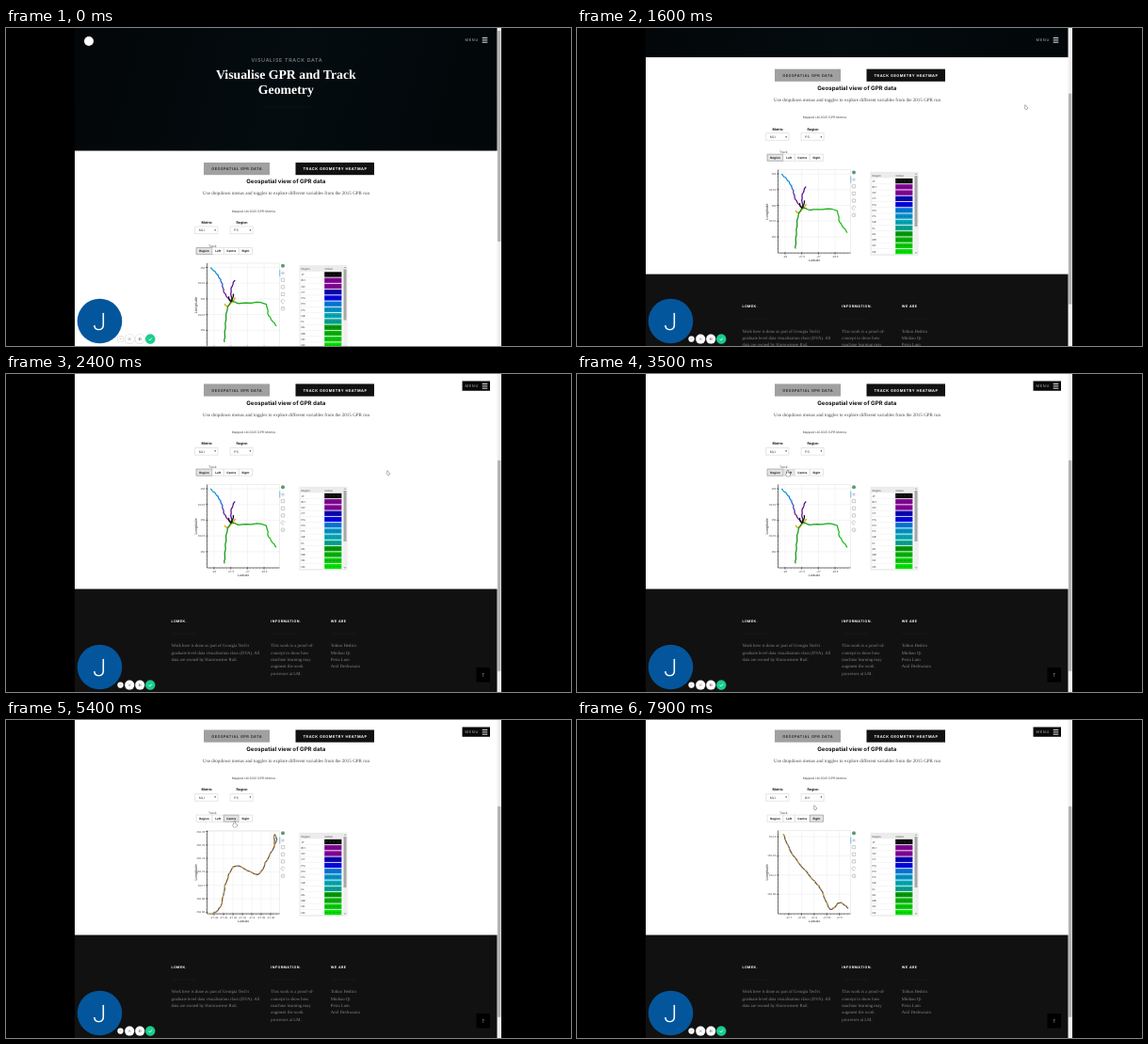
An HTML page with a canvas that plays this animation: 600x338 px, repeating every 8000 ms.

```html
<!DOCTYPE html>
<html lang="en">
<head>
<meta charset="utf-8">
<title>Track data viewer</title>
<style>
html, body { margin: 0; width: 100%; height: 100%; overflow: hidden; background: #000; }
canvas { display: block; width: 600px; height: 338px; }
</style>
</head>
<body>
<canvas id="stage"></canvas>
<script>
const canvas = document.getElementById('stage');
const c = canvas.getContext('2d');
const ratio = window.devicePixelRatio || 1;
canvas.width = 600 * ratio;
canvas.height = 338 * ratio;

const SANS = 'Inter, sans-serif', SERIF = '"Liberation Serif", serif', ARIAL = '"Liberation Sans", sans-serif';
const LOOP = 8000, STEP = 100, END = 132.5;

// Pointer moves: start, end, x, y
const MOVES = [[2100, 2400, 406, 105], [2400, 3200, 224, 104], [4300, 4700, 243, 109],
  [5400, 5700, 254, 107], [6200, 6900, 253, 84], [7100, 7500, 253, 93]];

// Legend colours: row, hue, lightness
const SPECTRUM = [[0, 292, 0], [1, 292, 30], [2, 292, 30], [3, 242, 35], [4, 240, 45], [5, 207, 43],
  [8, 173, 33], [9, 122, 31], [12, 120, 45]];
const REGIONS = 'JT BH CR CT PG PN PS GE FL ML ME NC NA'.split(' ');

// Axes: first position, gap, first value, increment, count
const PLOTS = {
  all: { x: [221, 17.7, -28, .5, 4], y: [122, 16.7, 154, -.5, 5] },
  track: { x: [221, 10, -27.44, .01, 7], y: [118.5, 14.3, 152.78, -.02, 7],
    route: [[219, 206], [228, 198], [234, 172], [244, 155], [267, 164], [277, 149], [287, 129], [285, 122], [285, 132]] },
  branch: { x: [225, 13.4, -27.7, .05, 5], y: [124, 20.4, 152.2, -.05, 4],
    route: [[219, 121], [229, 143], [250, 169], [259, 180], [269, 201], [279, 194], [288, 200]] }
};

const clamp = v => Math.min(1, Math.max(0, v));

function rect(x, y, w, h, fill, stroke) {
  if (fill) { c.fillStyle = fill; c.fillRect(x, y, w, h); }
  if (stroke) { c.strokeStyle = stroke; c.lineWidth = .5; c.strokeRect(x, y, w, h); }
}
function disc(x, y, r, fill) {
  c.fillStyle = fill;
  c.beginPath();
  c.arc(x, y, r, 0, 7);
  c.fill();
}
function text(s, x, y, font, fill, align = 'left', gap = 0) {
  c.font = font;
  c.fillStyle = fill;
  c.textAlign = align;
  c.letterSpacing = gap + 'px';
  c.fillText(s, x, y);
}
function line(points, stroke, width = .5, dash = []) {
  c.strokeStyle = stroke;
  c.lineWidth = width;
  c.setLineDash(dash);
  c.beginPath();
  points.forEach(p => c.lineTo(...p));
  c.stroke();
  c.setLineDash([]);
}
function fade(x0, y0, x1, y1, ...colours) {
  const g = c.createLinearGradient(x0, y0, x1, y1);
  colours.forEach((colour, i) => g.addColorStop(i / (colours.length - 1), colour));
  return g;
}
function at(keys, k) {
  const i = Math.max(1, keys.findIndex(key => key[0] >= k));
  const a = keys[i - 1], b = keys[i], u = (k - a[0]) / (b[0] - a[0]);
  return a.slice(1).map((v, j) => v + (b[j + 1] - v) * u);
}
// Smooth curve through the points with a slight wobble, as surveyed track has
function curve(points, wobble = .4) {
  const out = [];
  for (let i = 0; i < points.length - 1; i++) {
    const [p, a, b, q] = [-1, 0, 1, 2].map(d => points[i + d] || points[d < 0 ? i : i + 1]);
    for (let k = 0; k <= 6; k++) {
      const u = k / 6, n = i * 6 + k;
      out.push([0, 1].map(j => a[j] + .5 * u * (b[j] - p[j]
        + u * (2 * p[j] - 5 * a[j] + 4 * b[j] - q[j] + u * (3 * (a[j] - b[j]) + q[j] - p[j])))
        + wobble * Math.sin(n * 2.1 + j * 1.6)));
    }
  }
  return out;
}

function header() {
  rect(73, 0, 449, 130.5, fade(73, 0, 521, 130, '#030608', '#040c0f', '#020709'));
  disc(88, 14, 5, '#fff');
  text('VISUALISE TRACK DATA', 298.3, 36, '500 5.4px ' + SANS, '#858a8c', 'center', .65);
  const title = 'bold 13.8px ' + SERIF;
  text('Visualise GPR and Track', 297.3, 53.5, title, '#fff', 'center');
  text('Geometry', 297.3, 70.3, title, '#fff', 'center');
  line([[275, 84], [324, 84]], '#10191c');
}

function select(x, value) {
  rect(x, 78.5, 24.2, 7.7, '#fff', '#ccc');
  text(value, x + 4, 83.8, '3.6px ' + ARIAL, '#444');
  text('▾', x + 21.3, 83.4, '3.4px "DejaVu Sans", sans-serif', '#333', 'center');
}

function controls(active, region, hover) {
  rect(210, 10.5, 70, 13.2, '#a0a0a0');
  text('GEOSPATIAL GPR DATA', 245.2, 18.5, '600 3.9px ' + SANS, '#222', 'center', .5);
  rect(307.5, 10.5, 83.5, 13.2, '#111');
  text('TRACK GEOMETRY HEATMAP', 349.5, 18.5, 'bold 3.9px ' + SANS, '#fff', 'center', .5);
  text('Geospatial view of GPR data', 297.3, 32.6, 'bold 6.15px ' + SANS, '#111', 'center');
  text('Use dropdown menus and toggles to explore different variables from the 2015 GPR run', 297.5, 44.7,
    '5.05px ' + SERIF, '#444', 'center');
  text('Mapped LM 2015 GPR Metrics', 263, 63, '3.4px ' + ARIAL, '#444', 'center');
  text('Metric', 213.3, 75.4, 'bold 3.6px ' + SANS, '#111', 'center');
  text('Region', 250.5, 75.4, 'bold 3.6px ' + SANS, '#111', 'center');
  select(200.7, 'MLI');
  select(238, region);
  text('Track', 219.2, 100.3, '3.5px ' + ARIAL, '#555', 'center');
  let x = 202;
  for (const [name, w] of [['Region', 17], ['Left', 12.3], ['Centre', 16], ['Right', 14.2]]) {
    const on = name === active;
    rect(x, 101, w, 7.2, on || name === hover ? '#e4e4e4' : '#fff', on ? '#777' : '#ccc');
    text(name, x + w / 2, 105.8, 'bold 3.1px ' + SANS, '#222', 'center');
    x += w;
  }
}

function ticks([pos, gap, value, increment, count], mark) {
  for (let i = 0; i < count; i++) mark(pos + i * gap, String(+(value + i * increment).toFixed(2)));
}

function network() {
  const green = fade(235, 0, 287, 0, '#0c960c', '#1cc01c');
  const west = fade(0, 122, 0, 157, '#18a0c8', '#0a80dc', '#5a20a0', '#7a0a8a');
  const draw = (colour, ...points) => line(curve(points), colour, 1.25);
  draw(west, [217, 122], [224, 129], [229, 138], [232, 149], [238, 157]);
  draw('#5a0a90', [243, 135], [239, 146], [240, 158]);
  draw('#e8a020', [232, 161], [236, 163], [244, 154]);
  draw(green, [241, 155], [235, 166], [233, 184], [232, 201]);
  draw(green, [239, 156], [247, 160], [274, 160], [279, 173], [287, 184]);
  draw('#111', [236, 153], [239, 158], [242, 150]);
}

function plot(kind) {
  const small = '2.9px ' + ARIAL, { x: xAxis, y: yAxis, route } = PLOTS[kind];
  rect(213.5, 117.5, 77, 88.5, '#fff', '#ddd');
  ticks(xAxis, (x, label) => {
    line([[x, 117.5], [x, 206]], '#e8e8e8');
    line([[x, 205], [x, 208]], '#222');
    text(label, x, 211, small, '#444', 'center');
  });
  ticks(yAxis, (y, label) => {
    line([[213.5, y], [290.5, y]], '#e8e8e8');
    line([[211.8, y], [214.5, y]], '#222');
    text(label, 211.2, y + 1, small, '#444', 'right');
  });
  // minor ticks
  for (let i = 1; i < 22; i++) {
    line([[213.5 + i * 3.5, 206], [213.5 + i * 3.5, 207]], '#555', .3);
    line([[212.5, 117.5 + i * 4], [213.5, 117.5 + i * 4]], '#555', .3);
  }
  line([[213.5, 117.5], [213.5, 206], [290.5, 206]], '#222', .6);
  text('Latitude', 252, 215, '3.5px ' + ARIAL, '#333', 'center');
  c.save();
  c.translate(202.7, 162);
  c.rotate(-Math.PI / 2);
  text('Longitude', 0, 0, '3.9px ' + ARIAL, '#333', 'center');
  c.restore();

  if (!route) return network();
  const points = curve(route);
  line(points, '#57505a', 1.2);
  line(points, '#e0a028', 1.2, [3, 2.5, 1.5, 4]);
}

function toolbar() {
  const grey = '#999';
  disc(294, 120.3, 2, '#5a9a72');
  line([[290.8, 124.5], [290.8, 131.5]], '#30a8dc', .7);
  line([[292, 128], [296, 128]], grey);
  line([[294, 126], [294, 130]], grey);
  for (let y = 133.6; y < 150; y += 7.6) rect(292.3, y, 3.4, 3.2, null, grey);
  for (const y of [158, 165.7]) {
    c.beginPath();
    c.arc(294, y, 1.9, y < 160 ? .9 : 0, 6.3);
    c.stroke();
  }
  text('?', 294, 166.8, '3px ' + ARIAL, grey, 'center');
}

function table() {
  const font = '2.9px ' + ARIAL;
  rect(312, 120.3, 50, 87.7, '#fff', '#ccc');
  rect(312, 120.3, 46, 6, '#ececec');
  text('Region', 313.5, 124.6, font, '#444');
  text('Colour', 338.5, 124.6, font, '#444');
  REGIONS.forEach((name, i) => {
    const y = 126.4 + i * 6.25, [hue, light] = at(SPECTRUM, i);
    text(name, 313.5, y + 4.2, font, '#333');
    rect(338.2, y + .4, 18.2, 5.4, `hsl(${hue}, 95%, ${light}%)`);
    line([[339, y + 3.2], [356, y + 3.2]], i ? 'rgba(0,0,0,.5)' : '#555', .6, [1.4, 1, .6, 1.3]);
    line([[312, y + 6.25], [358, y + 6.25]], '#ddd', .3);
  });
  rect(358, 120.3, 4, 87.7, '#f0f0f0');
  rect(358.5, 124, 3, 54, '#a8a8a8');
  line([[359, 122.8], [360, 121.6], [361, 122.8]], '#555');
  line([[359, 205.2], [360, 206.4], [361, 205.2]], '#555');
}

function footer() {
  rect(73, 228.5, 449, 150, '#111112');
  const columns = [
    [175.5, 'LOMEK.', ["Work here is done as part of Georgia Tech's", 'graduate level data visualisation class (DVA). All',
      'data are owned by Harrowmere Rail.']],
    [281.3, 'INFORMATION.', ['This work is a proof-of-', 'concept to show how', 'machine learning may', 'augment the work', 'processes at LM.']],
    [344.8, 'WE ARE', ['Tobias Hedrin', 'Minhao Qi', 'Petra Lum', 'Anil Deshwaran']]
  ];
  for (const [x, head, rows] of columns) {
    text(head, x, 263.7, 'bold 3.6px ' + SANS, '#fff', 'left', .45);
    line([[x, 276], [x + 27, 276]], '#1c1c1d');
    rows.forEach((row, i) => text(row, x, 290.4 + i * 7.35, '4.75px ' + SERIF, '#85857f'));
  }
}

function overlay(scroll) {
  rect(521.5, 0, 4.5, 338, '#f1f1f1');
  rect(522, 3 + scroll * .67, 3.5, 224, '#b4b4b4');
  if (scroll > 120) {
    rect(484.5, 7.5, 29.5, 10.3, '#080808');
    rect(499.5, 312, 14.5, 15.5, '#000');
    line([[506.7, 322], [506.7, 318]], '#999');
    line([[505.6, 319.2], [506.7, 318], [507.8, 319.2]], '#999');
  }
  text('MENU', 487.5, 14, '3.9px ' + SANS, '#b4b4b4', 'left', .7);
  for (const y of [10.6, 12.9, 15.2]) line([[505.7, y], [511.3, y]], '#fff', .9);

  disc(99.5, 311.5, 23.8, '#04569c');
  text('J', 99.3, 320.8, '300 25.5px Roboto, sans-serif', '#fff', 'center');
  for (const [x, r, colour] of [[121.5, 3.1, '#fff'], [131.2, 5, '#fff'], [142.2, 5, '#fff'], [153.2, 5.1, '#14d08c']]) {
    disc(x, 330.6, r + .4, 'rgba(130,130,130,.4)');
    disc(x, 330.6, r, colour);
  }
  line([[120.4, 330.6], [122.6, 330.6]], '#999');
  for (const d of [-1.2, 1.2]) {
    line([[131.2 - d, 329.4], [131.2 + d, 331.8]], '#666');
    line([[142.2 + d * .65, 329.2], [142.2 + d * .65, 332]], '#666', .7);
  }
  line([[151.5, 330.7], [152.8, 332], [155, 329.4]], '#fff', .8);
}

function pointer(x, y, hand) {
  c.save();
  c.translate(x, y);
  c.beginPath();
  if (hand) {
    c.roundRect(-.7, -1.5, 1.2, 4, .5);
    c.roundRect(-1.8, 1.3, 4, 3.4, 1);
  } else {
    for (const p of [[-.9, -2.2], [-.9, 2], [.8, 2.4], [1.9, 1]]) c.lineTo(...p);
    c.closePath();
  }
  c.strokeStyle = '#333';
  c.lineWidth = .8;
  c.stroke();
  c.fillStyle = '#fff';
  c.fill();
  c.restore();
}

function draw(now) {
  const t = Math.floor(now % LOOP / STEP) * STEP;
  const scroll = END * clamp((t - 1300) / 400);
  let px = 477, py = 84;
  for (const [from, to, x, y] of MOVES) {
    const u = clamp((t - from) / (to - from));
    px += (x - px) * u;
    py += (y - py) * u;
  }
  const active = t < 3700 ? 'Region' : t < 4700 ? 'Left' : t < 5800 ? 'Centre' : 'Right';
  const region = t < 7600 ? 'PS' : 'BH';
  const hand = py > 100 && py < 110 && px < 262;

  c.setTransform(ratio, 0, 0, ratio, 0, 0);
  c.textRendering = 'geometricPrecision';
  c.lineJoin = 'round';
  rect(0, 0, 600, 338, '#000');
  rect(73, 0, 449, 338, '#fff');
  c.save();
  c.translate(0, -scroll);
  header();
  c.translate(0, END);
  controls(active, region, hand && px < 231 ? 'Left' : '');
  plot(active === 'Region' ? 'all' : region === 'PS' ? 'track' : 'branch');
  toolbar();
  table();
  footer();
  c.restore();
  overlay(scroll);
  if (t >= 1400) pointer(px, py, hand);
}

const start = performance.now();
function tick() {
  draw(performance.now() - start);
  requestAnimationFrame(tick);
}
tick();
</script>
</body>
</html>
```
